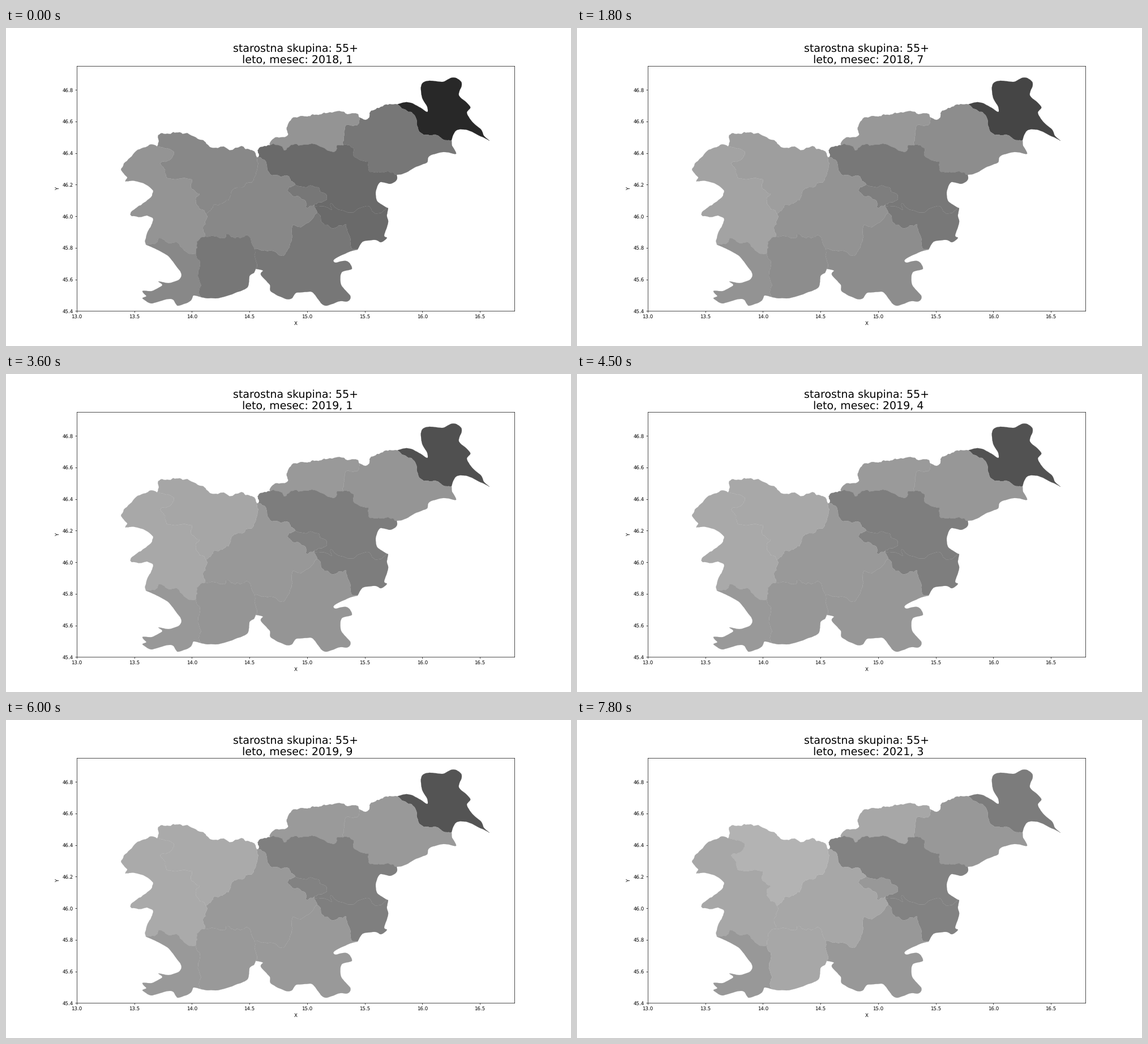
Write a matplotlib script that moves like this. It is 998 px wide and 561 px high and loops after 8000 ms.

```python
import numpy as np
import matplotlib.pyplot as plt
from matplotlib.animation import FuncAnimation

LEFT, BOTTOM = 124.75, 499.3      # stage position of the axes corner
PX_X, PX_Y = 203.54, 278.7        # pixels per degree
INTERVAL, FRAMES, HOLD = 100, 80, 3
DECAY = 6                         # months in which the first levels fade out

rng = np.random.default_rng(7)

# Points where three borders meet
nodes = dict(
    A=(267, 209), B=(443, 229), C=(466, 207), D=(624, 158), E=(691, 135),
    X=(854, 199), F=(787, 198), G=(690, 259), H=(675, 318), I=(621, 391),
    J=(441, 425), K=(345, 475), L=(247, 382), M=(596, 207), N=(353, 328),
    O=(352, 368), P=(336, 397), Q=(438, 389), R=(511, 276), S=(546, 310),
    U=(545, 315), V=(550, 326), Y=(567, 300))
arcs = {}


def arc(ends, *flat, rough=0.1):
    """Join two nodes through key points by subdivision with random relief."""
    line = np.array([nodes[ends[0]], *zip(flat[::2], flat[1::2]),
                     nodes[ends[1]]], float)
    for _ in range(3):
        padded = np.vstack([line[:1], line, line[-1:]])
        middle = (9 * (line[:-1] + line[1:]) - padded[:-3] - padded[3:]) / 16
        normal = np.diff(line, axis=0)[:, ::-1] * (-1, 1)
        middle += normal * rng.normal(0, rough, (len(middle), 1))
        merged = np.empty((2 * len(line) - 1, 2))
        merged[::2], merged[1::2] = line, middle
        line = merged
    arcs[ends], arcs[ends[::-1]] = line, line[::-1]


def river(ends, *flat):
    arc(ends, *flat, rough=0.02)


# Outer border, clockwise from the north-west
arc("AB", 270, 200, 269, 189, 291, 187, 312, 187, 342, 197, 359, 209, 374, 212,
    414, 209, 423, 214, 437, 217, 441, 222)
arc("BC", 447, 225, 448, 211)
arc("CD", 473, 195, 497, 190, 496, 180, 503, 163, 527, 156, 547, 153, 568, 150,
    600, 151, 619, 151)
arc("DE", 631, 161, 642, 157, 645, 146, 668, 136)
river("EX", 706, 131, 720, 134, 743, 148, 744, 139, 735, 123, 734, 100, 748, 93,
      772, 95, 786, 88, 798, 90, 805, 99, 800, 119, 820, 139, 814, 149,
      824, 166, 839, 179, 844, 190)
river("XF", 838, 191, 823, 183, 806, 179, 793, 183)
river("FG", 788, 208, 795, 222, 776, 219, 748, 226, 744, 237, 722, 246,
      704, 256)
river("GH", 690, 268, 678, 275, 661, 272, 653, 290, 657, 307)
river("HI", 673, 333, 675, 343, 668, 366, 673, 370, 662, 378, 653, 374,
      630, 377)
river("IJ", 606, 395, 580, 408, 583, 414, 601, 411, 611, 425, 593, 431,
      592, 453, 608, 472, 604, 482, 590, 482, 566, 490, 554, 482, 546, 471,
      537, 465, 513, 467, 506, 476, 494, 478, 468, 465, 466, 453, 450, 435,
      454, 428)
river("JK", 438, 432, 430, 438, 427, 457, 408, 466, 370, 477)
river("KL", 331, 472, 325, 482, 303, 490, 292, 478, 258, 486, 241, 477, 248, 473,
      241, 464, 258, 464, 276, 454, 269, 447, 287, 450, 304, 445, 309, 432,
      290, 406, 269, 392)
arc("LA", 248, 366, 257, 347, 257, 334, 222, 332, 228, 319, 244, 308, 260, 287,
    228, 270, 211, 271, 214, 263, 203, 250, 219, 229, 243, 211, 261, 206,
    rough=0.06)

# Inner borders
arc("DM", 620, 172, 602, 171, 598, 188)
arc("EF", 711, 148, 725, 161, 736, 187, 756, 188, 771, 196)
arc("CM", 491, 216, 500, 210, 526, 206, 579, 219, 584, 208)
arc("MG", 611, 211, 615, 227, 640, 236, 643, 254, 658, 254)
arc("UH", 575, 321, 576, 310, 637, 314, 653, 328)
arc("VI", 561, 345, 575, 353, 600, 346, 608, 370, 612, 390)
arc("VQ", 541, 337, 507, 347, 502, 380, 490, 402, 470, 393)
arc("QJ", 440, 406)
arc("PK", 343, 417, 343, 450)
arc("LP", 264, 380, 270, 371, 290, 380, 306, 381)
arc("AN", 290, 214, 294, 228, 274, 237, 281, 256, 298, 267, 328, 267, 328, 284,
    342, 293, 336, 306)
arc("BN", 441, 260, 413, 281, 397, 293, 392, 304, 369, 311)
arc("NO", 348, 351)
arc("OP", 337, 377)
arc("OQ", 385, 371, 389, 364, 405, 371, 427, 366)
arc("BR", 457, 233, 470, 260, 500, 262)
arc("RS", 497, 286, 508, 297, 528, 304, 531, 317)
arc("RY", 533, 280, 553, 282)
arc("YS", 559, 307)
arc("SU")
arc("UV")

# Grey of each region: at the start, settled in 2019, and in 2021
REGIONS = {
    "EXFE": (40, 86, 124),
    "DEFGMD": (119, 154, 152),
    "CDMC": (148, 154, 167),
    "BCMGHUSYRB": (106, 128, 130),
    "RYSR": (119, 130, 152),
    "UHIVU": (106, 128, 130),
    "VIJQV": (119, 154, 152),
    "BRSUVQONB": (136, 154, 167),
    "ABNA": (136, 171, 179),
    "LANOPL": (148, 171, 167),
    "LPKL": (136, 154, 152),
    "OQJKPO": (119, 154, 167),
}
YEARS = (2018, 2019, 2021)


def outline(loop):
    x, y = np.vstack([arcs[a + b] for a, b in zip(loop, loop[1:])]).T
    return 13 + (x - LEFT) / PX_X, 45.4 + (BOTTOM - y) / PX_Y


plt.rcParams.update({"font.family": "DejaVu Sans", "text.hinting": "none"})
fig, ax = plt.subplots(figsize=(16, 8.995), dpi=62.375)
ax.set(xlim=(13, 16.8), ylim=(45.4, 46.95), xlabel="X", ylabel="Y")
title = ax.set_title("", fontsize=22, linespacing=1.14)
patches = [ax.fill(*outline(loop), lw=0.25)[0] for loop in REGIONS]


def update(frame):
    month = frame // HOLD
    year = YEARS[month // 12]
    for patch, (start, settled, last) in zip(patches, REGIONS.values()):
        level = settled + (start - settled) * np.exp(-month / DECAY)
        grey = round(last if year == YEARS[-1] else level) / 255
        patch.set_color((grey, grey, grey))
    title.set_text(f"starostna skupina: 55+\n leto, mesec: {year}, {month % 12 + 1}")
    return [*patches, title]


anim = FuncAnimation(fig, update, frames=FRAMES, interval=INTERVAL,
                     repeat=True, repeat_delay=0, blit=False)
plt.show()
```
